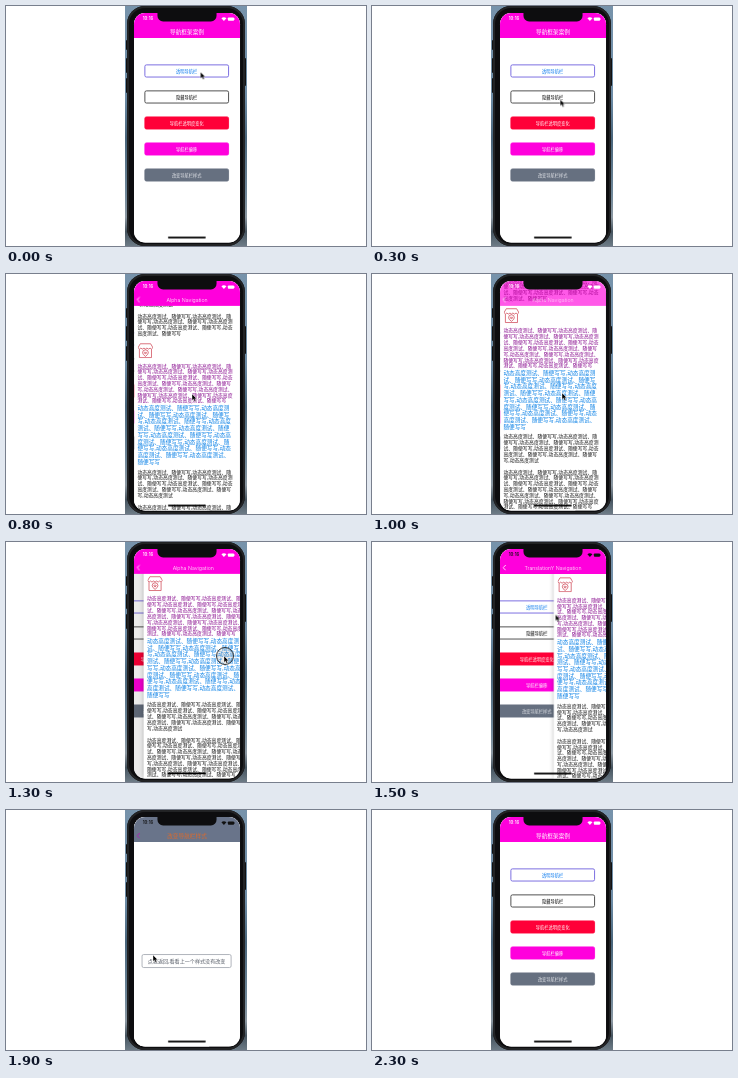
These frames come from a looping animation (360x240 px, 2400 ms). An HTML page:

```html
<!DOCTYPE html>
<html lang="zh-CN">
<head>
<meta charset="utf-8">
<title>导航框架案例</title>
<style>
html, body { margin: 0; width: 100%; height: 100%; overflow: hidden; background: #fff; }
body { font-family: "Noto Sans CJK SC", "Noto Sans CJK", sans-serif; }
.stage { position: relative; width: 360px; height: 240px; overflow: hidden; background: #fff; }
.stage > * { position: absolute; }

.wall { left: 119px; top: 0; width: 122px; height: 240px;
  background: linear-gradient(#7793ab 0%, #6d8ca6 38%, #49657b 55%, #6f8799 78%, #8b97a1 88%, #46545f 94%, #6d7b86 100%); }
.key { background: #111; width: 2px; border-radius: 1px; }
.body { left: 121px; top: 0; width: 118px; height: 240px; border-radius: 18px; background: #0d0d0f;
  box-shadow: inset 0 0 0 2px #222325; }

/* Screen is laid out in 375 x 812 points and scaled down. */
.screen { left: 127.5px; top: 6.5px; width: 375px; height: 812px; overflow: hidden; border-radius: 40px;
  background: #fff; transform: scale(.2827); transform-origin: 0 0; }
.screen > * { position: absolute; }
.page { inset: 0; background: #fff; overflow: hidden; }
.over { box-shadow: 0 0 18px rgba(0,0,0,.3); }
.page, .bar, .status, .fill, .scroll, .title, .cursor, .ring { animation: 2.4s step-end infinite; }

.btn { position: absolute; left: 37px; width: 299px; height: 46px; box-sizing: border-box; border: 3px solid;
  border-radius: 7px; font-size: 15px; line-height: 40px; text-align: center; }
.btn span { font-weight: 500; }
.bar { left: 0; top: 0; width: 375px; height: 88px; visibility: hidden; }
.fill { position: absolute; inset: 0; background: #ff00dc; }
.title { position: absolute; left: 0; right: 0; top: 44px; line-height: 44px; text-align: center;
  font-size: 20px; color: #fff; }
.latin { font: 300 18.5px/44px Inter, "Open Sans", sans-serif; }
.back { position: absolute; left: 9px; top: 55px; width: 13px; height: 22px; fill: none; stroke: #fff; stroke-width: 3; }
.status { inset: 0 0 auto; height: 44px; color: #fff; }
.status b { position: absolute; left: 31px; top: 11px; font: 600 15px/20px Inter, sans-serif; }
.status svg { position: absolute; left: 308px; top: 14px; }
.notch { left: 83px; top: -4px; width: 209px; height: 34px; border-radius: 0 0 20px 20px; background: #0d0d0f; }
.grip { left: 120px; top: 791px; width: 134px; height: 6px; border-radius: 3px; background: #000; }

.scroll { position: absolute; left: 0; right: 0; top: -3px; height: 100%; }
.scroll p { position: absolute; left: 12px; width: 341px; margin: 0; color: #111;
  font-size: 17px; font-weight: 500; line-height: 20.5px; letter-spacing: .2px; }
.scroll .purple { color: #86088c; }
.scroll .blue { font-size: 20px; line-height: 23.9px; letter-spacing: 0; color: #0a80e6; }
.scroll svg { position: absolute; left: 13px; top: 222px; width: 55px; height: 55px; fill: none; stroke: #cf4655; stroke-width: 2.6; }

.home { animation-name: home; }
.alpha { animation-name: alpha; }
.shift { animation-name: shift; }
.style { animation-name: style; }
.homeBar { animation-name: homeBar; }
.alphaBar { animation-name: alphaBar; }
.shiftBar { animation-name: shiftBar; }
.styleBar { animation-name: styleBar; }
.alphaBar .fill { animation-name: fade; }
.alphaBar .title { animation-name: nudge; }
.alpha .scroll { animation-name: scrollUp; }
.shift .scroll { animation-name: scrollDown; }
.status { animation-name: tint; }
.cursor { left: 0; top: 0; animation-name: point; }
.ring { left: 210px; top: 105px; width: 16px; height: 16px; border: 1px solid #333; border-radius: 50%;
  background: rgba(90,90,90,.13); visibility: hidden; animation-name: press; }

@keyframes home {
  0%, 58.33%, 95.83%, 100% { transform: none; filter: none; }
  29.16%, 62.5%, 75%, 91.66% { transform: translateX(-56px); filter: none; }
  33.33%, 66.66%, 79.16% { transform: translateX(-112px); filter: none; }
  54.16% { transform: translateX(-102px); filter: brightness(.92); }
}
@keyframes alpha {
  0%, 58.33%, 100% { transform: translateX(420px); }
  29.16% { transform: translateX(190px); }
  33.33% { transform: none; }
  54.16% { transform: translateX(34px); }
}
@keyframes shift {
  0%, 79.16%, 100% { transform: translateX(420px); }
  62.5%, 75% { transform: translateX(190px); }
  66.66% { transform: none; }
}
@keyframes style {
  0%, 95.83%, 100% { transform: translateX(420px); }
  79.16% { transform: none; }
  91.66% { transform: translateX(190px); }
}
@keyframes homeBar {
  0%, 58.33%, 95.83%, 100% { visibility: visible; }
  29.16%, 62.5% { visibility: hidden; }
}
@keyframes alphaBar {
  0%, 58.33%, 100% { visibility: hidden; }
  29.16% { visibility: visible; }
}
@keyframes shiftBar {
  0%, 79.16%, 100% { visibility: hidden; }
  62.5% { visibility: visible; }
}
@keyframes styleBar {
  0%, 95.83%, 100% { visibility: hidden; }
  79.16% { visibility: visible; }
}
@keyframes fade {
  0%, 54.16%, 100% { opacity: 1; }
  37.5%, 50% { opacity: .82; }
  41.66% { opacity: .65; }
}
@keyframes nudge {
  0%, 58.33%, 100% { transform: none; opacity: 1; }
  41.66% { transform: none; opacity: .7; }
  54.16% { transform: translateX(22px); opacity: 1; }
}
@keyframes scrollUp {
  0% { transform: none; }
  37.5% { transform: translateY(-60px); }
  41.66%, 100% { transform: translateY(-124px); }
}
@keyframes scrollDown {
  0% { transform: translateY(-120px); }
  66.66% { transform: translateY(-60px); }
  70.83%, 100% { transform: none; }
}
@keyframes tint {
  0%, 95.83%, 100% { color: #fff; }
  62.5% { color: #111; }
}
@keyframes point {
  0% { transform: translate(194.5px, 66px); animation-timing-function: steps(6); }
  25% { transform: translate(182px, 121px); animation-timing-function: steps(4); }
  41.66% { transform: translate(190px, 119px); animation-timing-function: steps(3); }
  54.16% { transform: translate(218px, 114px); animation-timing-function: steps(4); }
  70.83% { transform: translate(149px, 31px); animation-timing-function: steps(2); }
  79.16% { transform: translate(147px, 145px); visibility: visible; }
  95.83%, 100% { transform: translate(147px, 145px); visibility: hidden; }
}
@keyframes press {
  0%, 58.33%, 100% { visibility: hidden; }
  54.16% { visibility: visible; }
}
</style>
</head>
<body>
<svg width="0" height="0" style="position:absolute">
  <symbol id="shop" viewBox="0 0 54 54">
    <path d="M9 3H45L52 15V18Q48 25 43 18Q38 25 32 18Q27 25 22 18Q16 25 11 18Q6 25 2 18V15ZM6 22V51H48V22"/>
    <path d="M27 47Q17 40 17 34A10 10 0 0 1 37 34Q37 40 27 47Z"/>
    <path d="M27 39L23 34Q24 30 27 33Q30 30 31 34Z"/>
  </symbol>
  <symbol id="arrow" viewBox="0 0 13 22"><path d="M11.5 1.5L2 11L11.5 20.5"/></symbol>
</svg>

<div class="stage">
  <div class="wall"></div>
  <i class="key" style="left:120px;top:34px;height:10px"></i>
  <i class="key" style="left:120px;top:52px;height:15px"></i>
  <i class="key" style="left:120px;top:72px;height:15px"></i>
  <i class="key" style="left:238px;top:52px;height:28px"></i>
  <div class="body"></div>

  <div class="screen">
    <div class="page home">
      <div class="btn" style="top:182px;border-color:#6657dc;color:#0879ee"><span>透明导航栏</span></div>
      <div class="btn" style="top:274px;border-color:#333;color:#000"><span>隐藏导航栏</span></div>
      <div class="btn" style="top:366px;border-color:#ff0038;background:#ff0038;color:#fff">导航栏透明度变化</div>
      <div class="btn" style="top:458px;border-color:#ff00dc;background:#ff00dc;color:#fff">导航栏偏移</div>
      <div class="btn" style="top:550px;border-color:#667080;background:#667080;color:#e4e6ea">改变导航栏样式</div>
    </div>
    <div class="page over alpha"><div class="scroll"></div></div>
    <div class="page over shift"><div class="scroll"></div></div>
    <div class="page over style">
      <div class="btn" style="left:27px;top:485px;width:318px;height:49px;line-height:43px;font-size:18px;border-color:#a3a8b0;color:#555b66">点我返回,看看上一个样式没有改变</div>
    </div>

    <div class="bar homeBar"><div class="fill"></div><div class="title">导航框架案例</div></div>
    <div class="bar alphaBar"><div class="fill"></div><svg class="back"><use href="#arrow"/></svg><div class="title latin">Alpha Navigation</div></div>
    <div class="bar shiftBar"><div class="fill"></div><svg class="back"><use href="#arrow"/></svg><div class="title latin">TranslationY Navigation</div></div>
    <div class="bar styleBar"><div class="fill" style="background:#69748a"></div><svg class="back" style="stroke:#b414b8"><use href="#arrow"/></svg><div class="title" style="color:#dc6a2c">改变导航栏样式</div></div>

    <div class="status">
      <b>10:16</b>
      <svg width="50" height="16" viewBox="0 0 50 16" fill="currentColor">
        <path d="M10 14L1 5Q10 -3 19 5Z"/>
        <rect x="24" y="2" width="22" height="11" rx="3"/>
        <rect x="47" y="5" width="2" height="5" rx="1"/>
      </svg>
    </div>
    <div class="notch"></div>
    <div class="grip"></div>
  </div>

  <div class="ring"></div>
  <svg class="cursor" width="7" height="9" viewBox="0 0 7 9" overflow="visible">
    <path d="M0 0V6.4L1.5 5.1L2.6 7.6L3.8 7.1L2.8 4.7H4.7Z" fill="#000" stroke="#fff" stroke-width=".4"/>
  </svg>
</div>

<script>
const phrase = "动态高度测试、随便写写";
const repeat = n => Array(n).fill(phrase).join(",");
const block = (top, text, tone = "") => `<p class="${tone}" style="top:${top}px">${text}</p>`;
const article =
  block(-8, repeat(7) + ",动态高度测试") +
  block(115.5, repeat(6)) +
  '<svg><use href="#shop"/></svg>' +
  block(292, repeat(12), "purple") +
  block(439, repeat(12), "blue") +
  block(667, repeat(7) + ",动态高度测试") +
  block(791, repeat(12));
document.querySelectorAll(".scroll").forEach(el => el.innerHTML = article);
</script>
</body>
</html>
```
